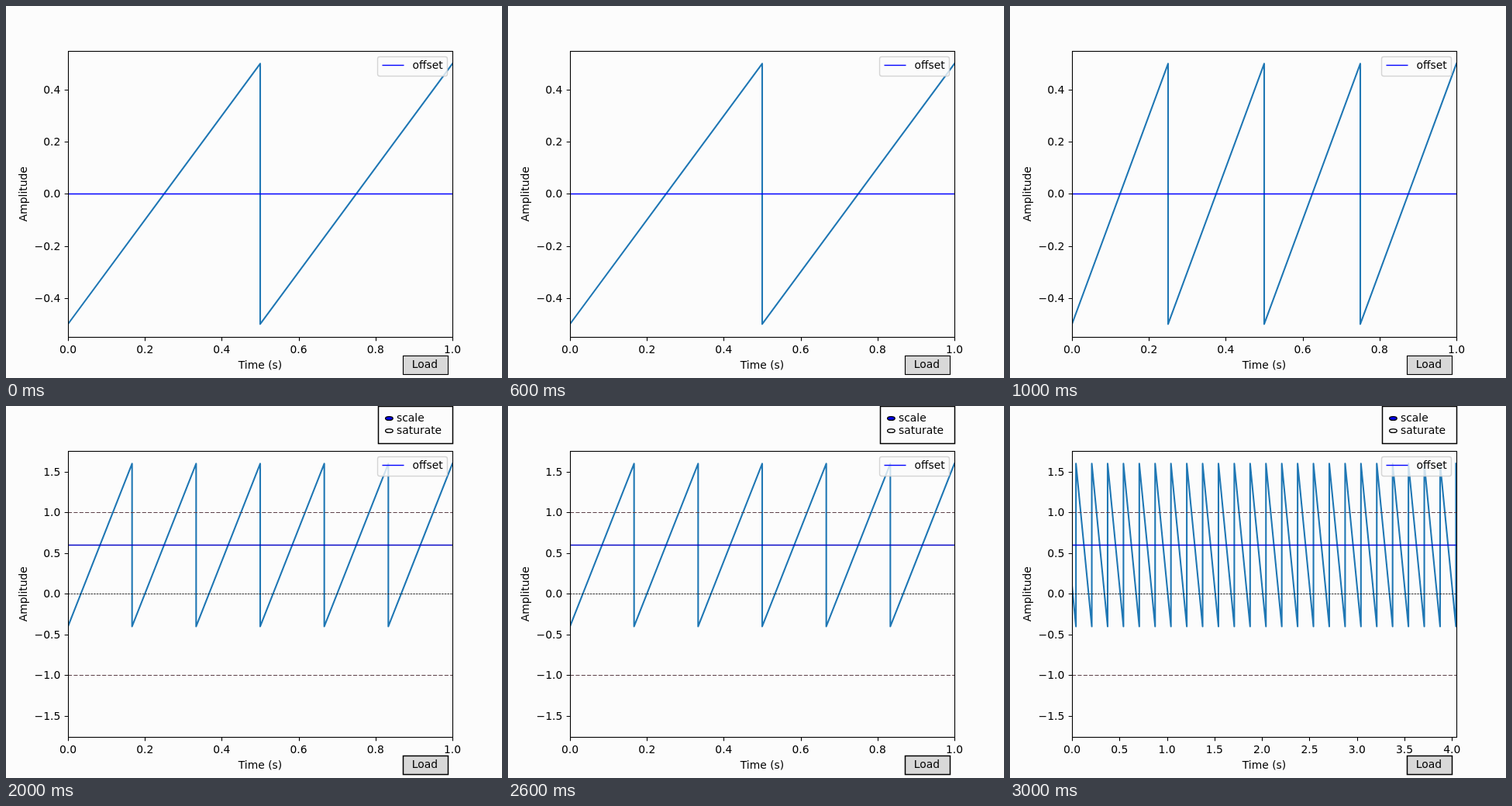
Recreate the animation shown at these times as an HTML page. Size 640 px wide and 480 px high, loop 4 s.

```html
<!DOCTYPE html>
<html lang="en">
<head>
<meta charset="utf-8">
<title>Sawtooth plot</title>
<style>
  html, body { margin: 0; width: 100%; height: 100%; overflow: hidden; background: #fcfcfc; }
  svg { display: block; width: 640px; height: 480px; }
  text { font: 13.89px "DejaVu Sans", sans-serif; fill: #000; }
  .mid { text-anchor: middle; }
  .end { text-anchor: end; }
  .edge { fill: none; stroke: #000; stroke-width: 1.11; }
  .wave { fill: none; stroke: #1f77b4; stroke-width: 2.08; stroke-linejoin: round; stroke-linecap: square; }
</style>
</head>
<body>
<svg viewBox="0 0 640 480">
  <defs><clipPath id="area"><rect x="80" y="57.6" width="496" height="369.6"/></clipPath></defs>
  <rect width="640" height="480" fill="#fcfcfc"/>
  <g id="ticks"></g>
  <g clip-path="url(#area)">
    <path id="wave" class="wave"/>
    <g id="limits">
      <path d="M80 137.5H576M80 347.5H576" stroke="#5c4048" stroke-width="1.2" stroke-dasharray="5.14 2.22"/>
      <path d="M80 242.5H576" stroke="#000" stroke-width=".8" stroke-dasharray="2.57 1.11"/>
    </g>
    <path id="offset" stroke-width="1.39"/>
  </g>
  <rect class="edge" x="80.5" y="58.5" width="496" height="369"/>
  <rect x="479.5" y="65.5" width="90" height="25" rx="2.8" fill="#fcfcfc" fill-opacity=".8" stroke="#ccc" stroke-opacity=".8" stroke-width="1.39"/>
  <path d="M485.5 76.5H513.5" stroke="#00f" stroke-width="1.39"/>
  <text x="524.5" y="81">offset</text>
  <text class="mid" x="328" y="468">Time (s)</text>
  <text class="mid" transform="translate(27 242.7) rotate(-90)">Amplitude</text>
  <rect id="button" x="512.5" y="451.5" width="58" height="24" fill="#d8d8d8" stroke="#000"/>
  <text class="mid" x="540.5" y="467">Load</text>
  <g id="modes">
    <rect class="edge" x="480.5" y=".5" width="96" height="48" style="stroke-width:1.5"/>
    <ellipse cx="494.4" cy="16" rx="4.8" ry="2.4" fill="#00f" stroke="#000" stroke-width="1.39"/>
    <ellipse cx="494.4" cy="32" rx="4.8" ry="2.4" fill="#fcfcfc" stroke="#000" stroke-width="1.39"/>
    <text x="504" y="20">scale</text>
    <text x="504" y="36">saturate</text>
  </g>
</svg>
<script>
const $ = id => document.getElementById(id);
const HOLD = 1000;

// span: seconds shown, top: y limit, amp: half height, shift: time of first jump
const small = { span: 1, xStep: 0.2, top: 0.55, yStep: 0.2, amp: 0.5, offset: 0, blue: '#00f' };
const large = { span: 1, xStep: 0.2, top: 1.76, yStep: 0.5, amp: 1, offset: 0.6, blue: '#0808c8', modes: true };
const scenes = [
  { ...small, freq: 2 },
  { ...small, freq: 4 },
  { ...large, freq: 6 },
  { ...large, freq: 6, span: 4.0465, xStep: 0.5, falling: true, shift: 1 / 24, blue: '#0808d8' }
];

const snap = v => Math.floor(v + 0.5) + 0.5;
const label = v => (v < -1e-6 ? '\u2212' : '') + Math.abs(v).toFixed(1);

function wavePath(s, x, y) {
  const low = s.offset - s.amp, high = s.offset + s.amp;
  const points = [];
  const add = (t, v) => points.push(x(t).toFixed(2) + ' ' + y(v).toFixed(2));
  if (s.falling) {
    add(0, low + 2 * s.amp * s.freq * s.shift);
    for (let t = s.shift; t <= s.span; t += 1 / s.freq) {
      add(t, low);
      add(t, high);
    }
  } else {
    for (let i = 0; i < s.freq * s.span; i++) {
      add(i / s.freq, low);
      add((i + 1) / s.freq, high);
    }
  }
  return 'M' + points.join('L');
}

function tickMarks(s, x, y) {
  let marks = '', labels = '';
  for (let i = 0; i * s.xStep <= s.span + 1e-6; i++) {
    const v = i * s.xStep;
    marks += `M${snap(x(v))} 427.5v4.86`;
    labels += `<text class="mid" x="${x(v)}" y="448">${label(v)}</text>`;
  }
  const n = Math.floor(s.top / s.yStep);
  for (let i = -n; i <= n; i++) {
    const v = i * s.yStep;
    marks += `M80.5 ${snap(y(v))}h-4.86`;
    labels += `<text class="end" x="70.3" y="${Math.round(y(v) + 5)}">${label(v)}</text>`;
  }
  return `<path class="edge" d="${marks}"/>${labels}`;
}

function draw(s) {
  const x = t => 80 + t / s.span * 496;
  const y = v => 242.4 - v / s.top * 184.8;
  $('ticks').innerHTML = tickMarks(s, x, y);
  $('wave').setAttribute('d', wavePath(s, x, y));
  $('offset').setAttribute('d', `M80 ${snap(y(s.offset))}H576`);
  $('offset').setAttribute('stroke', s.blue);
  $('button').setAttribute('stroke-width', s.modes ? 1.5 : 1.11);
  for (const id of ['limits', 'modes']) $(id).style.display = s.modes ? '' : 'none';
}

let shown = 0;
const start = performance.now();
function tick() {
  const i = Math.floor((performance.now() - start) / HOLD) % scenes.length;
  if (i !== shown) draw(scenes[shown = i]);
  requestAnimationFrame(tick);
}
draw(scenes[0]);
requestAnimationFrame(tick);
</script>
</body>
</html>
```
